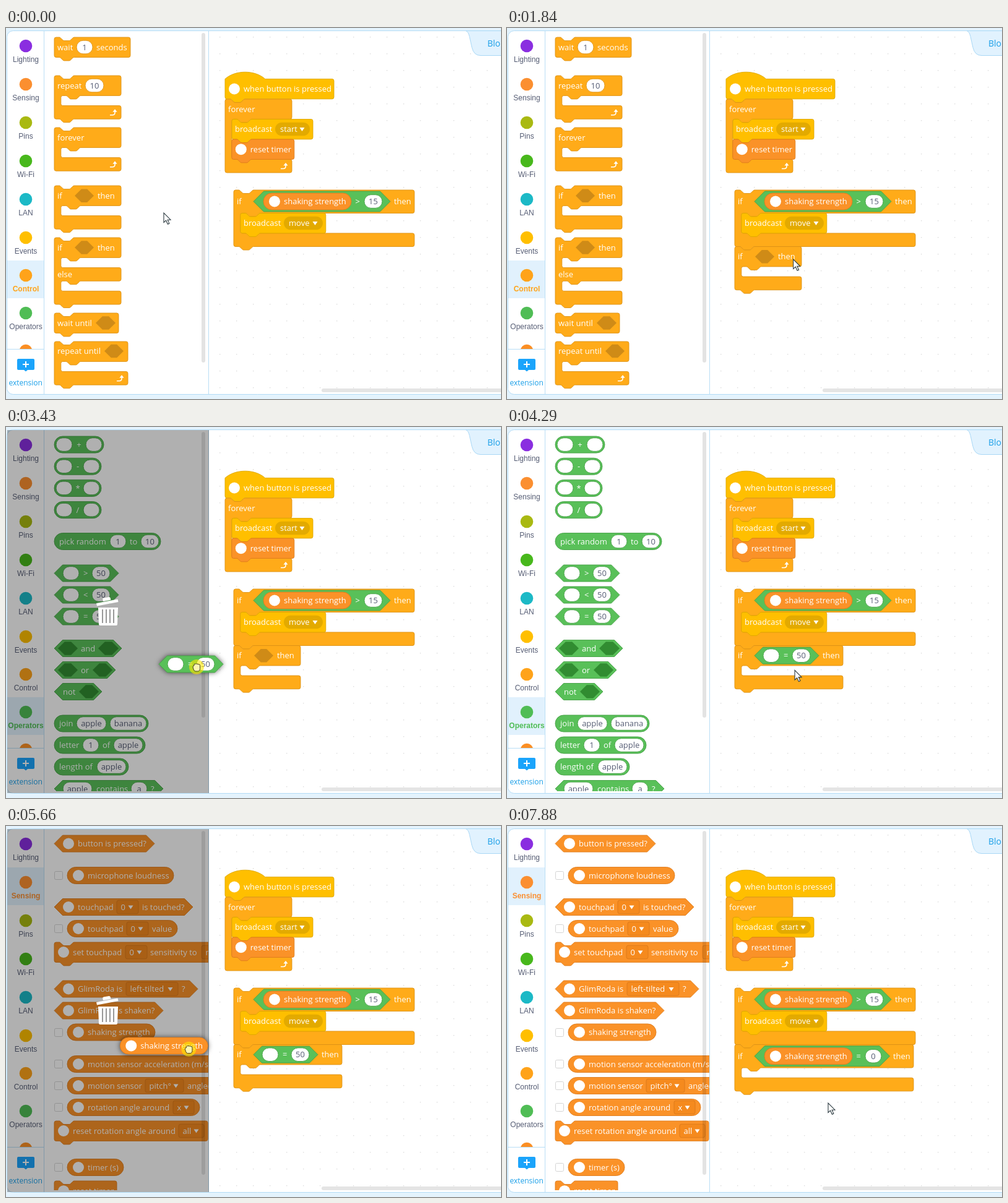
Animation of 800x600 px, one loop 8 s. Source, as an HTML page with a canvas:

```html
<!DOCTYPE html>
<html lang="en">
<head>
<meta charset="utf-8">
<title>Block editor</title>
<style>
html, body { margin: 0; width: 100%; height: 100%; overflow: hidden; background: #e4f3fd; }
canvas { display: block; }
</style>
</head>
<body>
<canvas id="stage" width="800" height="600"></canvas>
<script>
const g = document.getElementById('stage').getContext('2d');
const LOOP = 8000;
const UI = '13px "Open Sans", sans-serif';
const GREY = '#575e75';

// fill, outline, slot
const CONTROL = ['#ffab19', '#dd9216', '#cf8b17'];
const EVENTS = ['#ffbf00', '#dda600', '#e3aa00'];
const OPERATORS = ['#59c059', '#44a044', '#318c31'];
const SENSING = ['#fa9228', '#de7b1b', '#f58a1e'];

const ROW = 32.4, MOUTH = 16.2, ARM = 21.6, PILL = 27, SLOT = 21.6;
let lifted = false;   // the next shape casts a shadow

function shape(d, fill, stroke, width = 0.9) {
  const path = new Path2D(d);
  if (lifted) { g.shadowColor = 'rgba(0,0,0,.65)'; g.shadowBlur = 9; }
  lifted = false;
  if (fill) { g.fillStyle = fill; g.fill(path); }
  g.shadowColor = 'transparent';
  if (stroke) { g.strokeStyle = stroke; g.lineWidth = width; g.stroke(path); }
}

function text(s, x, y, color = '#fff', align = 'left', font = UI) {
  g.font = font;
  g.fillStyle = color;
  g.textAlign = align;
  g.fillText(s, x, y + 4.6);
}

function box(x, y, w, h, r, fill, stroke) {
  g.beginPath();
  g.roundRect(x, y, w, h, r);
  if (fill) { g.fillStyle = fill; g.fill(); }
  if (stroke) { g.strokeStyle = stroke; g.lineWidth = 1; g.stroke(); }
}

function disc(x, y, r, fill) {
  g.beginPath();
  g.arc(x, y, r, 0, 7);
  g.fillStyle = fill;
  g.fill();
}

function pill(x0, x1, y, h, fill, stroke) {
  const r = h / 2, arc = `a${r} ${r} 0 0 1 0 `;
  shape(`M${x0 + r} ${y - r}H${x1 - r}${arc}${h}H${x0 + r}${arc}${-h}z`, fill, stroke);
}

function hex(x0, x1, y, h, fill, stroke) {
  const r = h / 2;
  shape(`M${x0 + r} ${y - r}H${x1 - r}l${r} ${r}l${-r} ${r}H${x0 + r}l${-r} ${-r}z`, fill, stroke);
}

const NOTCH_R = 'c1.4 0 2 .7 2.7 1.4l2.7 2.7c.7 .7 1.4 1.4 2.7 1.4h8c1.4 0 2 -.7 2.7 -1.4l2.7 -2.7c.7 -.7 1.4 -1.4 2.7 -1.4';
const NOTCH_L = 'c-1.4 0 -2 .7 -2.7 1.4l-2.7 2.7c-.7 .7 -1.4 1.4 -2.7 1.4h-8c-1.4 0 -2 -.7 -2.7 -1.4l-2.7 -2.7c-.7 -.7 -1.4 -1.4 -2.7 -1.4';
const HAT = 'c16.9 -14.9 47.9 -14.9 64.8 0';

// heights alternate: row, mouth, row, mouth, ... row
function block(x, y, w, [fill, stroke], heights = [ROW], { hat, cap, loop } = {}) {
  const turn = (dx, dy, sweep) => `a3 3 0 0 ${sweep} ${dx} ${dy}`;
  let d = hat ? `M${x} ${y}${HAT}` : `M${x} ${y + 3}${turn(3, -3, 1)}h5${NOTCH_R}`;
  let bottom = y;
  heights.forEach((h, i) => {
    bottom += h;
    d += i % 2
      ? `H${x + 43}${NOTCH_L}h-5${turn(-3, 3, 0)}V${bottom - 3}${turn(3, 3, 0)}`
      : `H${x + w - 3}${turn(3, 3, 1)}V${bottom - 3}${turn(-3, 3, 1)}`;
  });
  if (!cap) d += `H${x + 32.2}${NOTCH_L}`;
  shape(d + `H${x + 3}${turn(-3, -3, 1)}${hat ? `V${y}` : ''}z`, fill, stroke);
  if (loop) {
    const ax = x + w - 13, ay = bottom - 10.5;
    shape(`M${ax - 5} ${ay + 4}h4q4 0 4 -4v-2`, null, '#fff', 1.6);
    shape(`M${ax - 0.6} ${ay - 1}h7.2l-3.6 -4.4z`, '#fff');
  }
}

// [x] badge, [x, text] label, [x0, x1] empty slot, [x0, x1, text] field, [x0, x1, text, true] menu
function row(y, color, ...items) {
  for (const [a, b, s, menu] of items) {
    if (b === undefined) disc(a, y, 9, '#fff');
    else if (typeof b === 'string') text(b, a, y);
    else if (s === undefined) hex(a, b, y, SLOT, color[2]);
    else if (menu) {
      const round = color === EVENTS;
      if (round) pill(a, b, y, SLOT, color[2]);
      else box(a, y - 10.8, b - a, SLOT, 3, color[2], color[1]);
      text(s, a + (round ? 8 : 6.5), y);
      shape(`M${b - 16.5} ${y - 2.5}h8l-4 6z`, '#fff');
    } else {
      pill(a, b, y, SLOT, '#fff', color[1]);
      text(s, (a + b) / 2, y, GREY, 'center');
    }
  }
}

function pillRow(x0, x1, y, color, ...items) {
  pill(x0, x1, y, PILL, color[0], color[1]);
  row(y, color, ...items);
}

function hexRow(x0, x1, y, color, ...items) {
  hex(x0, x1, y, PILL, color[0], color[1]);
  row(y, color, ...items);
}

function ifBlock(x, y) {
  block(x, y, 108, CONTROL, [ROW, MOUTH, ARM]);
  row(y + 16.2, CONTROL, [x + 5, 'if'], [x + 33, x + 64], [x + 70, 'then']);
}

const compare = (x, y, sign) =>
  hexRow(x, x + 104, y, OPERATORS, [x + 14, x + 40, ''], [x + 47, sign], [x + 61, x + 90, '50']);

const shaking = (x, y) =>
  pillRow(x, x + 142, y, SENSING, [x + 18], [x + 33, 'shaking strength']);

function resetTimer(x, y) {
  block(x, y, 101, SENSING);
  row(y + 16.2, SENSING, [x + 15], [x + 30, 'reset timer']);
}

function controlPalette() {
  const C = CONTROL, loop = { loop: true };
  block(78, 15, 123, C);
  row(31, C, [83, 'wait'], [114, 140, '1'], [146, 'seconds']);
  block(78, 77, 108, C, [ROW, MOUTH, ARM], loop);
  row(93, C, [83, 'repeat'], [128, 158, '10']);
  block(78, 161, 108, C, [ROW, MOUTH, ARM], { loop: true, cap: true });
  row(177, C, [83, 'forever']);
  ifBlock(78, 255);
  block(78, 339, 108, C, [ROW, MOUTH, ARM, MOUTH, ARM]);
  row(355, C, [83, 'if'], [111, 142], [148, 'then']);
  row(398, C, [83, 'else']);
  block(78, 461, 104, C);
  row(477, C, [83, 'wait until'], [145, 177]);
  block(78, 507, 119, C, [ROW, MOUTH, ARM], loop);
  row(522.5, C, [83, 'repeat until'], [159, 190]);
}

function operatorsPalette() {
  const C = OPERATORS;
  ['+', '-', '*', '/'].forEach((sign, i) => {
    const wide = i ? 0 : 4, y = 28.5 + i * 35.2;
    pillRow(78, 154 + wide, y, C, [81, 107, ''], [125 + wide, 151 + wide, '']);
    text(sign, 116 + wide / 2, y, '#fff', 'center');
  });
  pillRow(78, 250, 185, C, [86, 'pick random'], [168, 194, '1'], [200, 'to'], [218, 247, '10']);
  ['>', '<', '='].forEach((sign, i) => compare(78, 236.5 + i * 35, sign));
  hexRow(78, 187, 358, C, [84, 116], [121, 'and'], [149, 182]);
  hexRow(78, 177, 393, C, [84, 116], [121, 'or'], [140, 172]);
  hexRow(78, 155, 428, C, [92, 'not'], [118, 150]);
  pillRow(78, 230, 479.5, C, [86, 'join'], [114, 162, 'apple'], [168, 227, 'banana']);
  pillRow(78, 225, 514.5, C, [86, 'letter'], [124, 150, '1'], [156, 'of'], [174, 221, 'apple']);
  pillRow(78, 198, 549.5, C, [86, 'length of'], [147, 194, 'apple']);
  hexRow(78, 254, 585, C, [92, 139, 'apple'], [146, 'contains'], [202, 228, 'a'], [234, '?']);
}

function sensingPalette() {
  const C = SENSING;
  for (const y of [80, 166, 334, 385, 420, 455, 552]) box(78.5, y - 6.5, 13, 13, 2, '#fff', '#d4d4d4');
  hexRow(78, 240, 28.5, C, [101], [116, 'button is pressed?']);
  pillRow(99, 271, 80, C, [117], [132, 'microphone loudness']);
  hexRow(78, 302, 131, C, [101], [116, 'touchpad'], [179, 214, '0', true], [220, 'is touched?']);
  pillRow(99, 277, 166, C, [117], [132, 'touchpad'], [195, 230, '0', true], [236, 'value']);
  block(78, 188, 319, C);
  row(204, C, [93], [108, 'set touchpad'], [193, 228, '0', true], [233, 'sensitivity to'], [316, 392, 'medium', true]);
  hexRow(78, 310, 263.5, C, [101], [116, 'GlimRoda is'], [194, 278, 'left-tilted', true], [284, '?']);
  hexRow(78, 254, 298.5, C, [101], [116, 'GlimRoda is shaken?']);
  shaking(99, 333.5);
  pillRow(99, 431, 385, C, [117], [132, 'motion sensor acceleration (m/s²) on'], [361, 395, 'x', true], [401, 'axis']);
  pillRow(99, 349, 420, C, [117], [132, 'motion sensor'], [225, 287, 'pitch°', true], [293, 'angle(°)']);
  pillRow(99, 313, 455, C, [117], [132, 'rotation angle around'], [270, 304, 'x', true]);
  block(78, 477, 248, C);
  row(493, C, [93], [108, 'reset rotation angle around'], [279, 320, 'all', true]);
  pillRow(99, 190, 552, C, [117], [132, 'timer (s)']);
  resetTimer(78, 574);
}

// palette, start time, scrollbar end
const TABS = {
  Control: [controlPalette, 0, 541],
  Operators: [operatorsPalette, 2130, 470],
  Sensing: [sensingPalette, 4950, 564],
};
const CATEGORIES = [
  ['Lighting', '#8a2ee0'], ['Sensing', '#fb8f30'], ['Pins', '#a9b912'], ['Wi-Fi', '#48b81c'],
  ['LAN', '#1cb9c6'], ['Events', '#ffbf00'], ['Control', '#ffa31a'], ['Operators', '#50bd55'],
];

function frame() {
  g.fillStyle = '#e4f3fd';
  g.fillRect(0, 0, 800, 600);
  box(1.5, 4.5, 830, 588, 10, '#fff', '#b3dcf6');
  g.fillStyle = '#dcdcdc';
  for (let x = 345; x < 800; x += 27)
    for (let y = 14; y < 590; y += 27) g.fillRect(x, y, 1.4, 1.4);
  shape('M743 4.5q4 1 6 9l4 18q3 13 14 13H802V4.5z', '#e1f2fe', '#a9d8f6', 1);
  text('Blo', 778, 25, '#1a9fe8', 'left', '14px "Open Sans", sans-serif');
}

function sidebar(active) {
  CATEGORIES.forEach(([name, color], i) => {
    const y = i < 6 ? 29 + i * 62 : 339 + (i - 5) * 61;
    const on = name === active;
    if (on) { g.fillStyle = '#e1f1fd'; g.fillRect(2, y - 24, 59, 61); }
    disc(32, y, 10.3, color);
    text(name, 32, y + 21.5, on ? color : GREY, 'center', `${on ? 'bold ' : ''}12px "Liberation Sans", Arial, sans-serif`);
  });
  disc(32, 522, 10.3, '#fb8f24');
  g.fillStyle = '#fff';
  g.fillRect(2, 519, 59, 66);
  g.fillStyle = '#b9def5';
  g.fillRect(2, 519, 59, 1);
  g.fillRect(61, 5, 1, 587);
  g.fillRect(327, 5, 1, 587);
  shape('M20 535H44q2 0 2 2V551q0 2 -2 2H35l-3 2.5l-3 -2.5H20q-2 0 -2 -2V537q0 -2 2 -2z', '#1ba4fb');
  shape('M27 544h10M32 539v10', null, '#fff', 2);
  text('extension', 31.7, 573.5, '#1a9fe8', 'center', '12px "Open Sans", sans-serif');
}

function workspace(t) {
  block(354, 82.4, 176, EVENTS, [ROW], { hat: true });
  row(98.5, EVENTS, [369], [384, 'when button is pressed']);
  block(354, 115, 108, CONTROL, [ROW, 65, ARM], { loop: true, cap: true });
  row(131, CONTROL, [359, 'forever']);
  block(365, 147.5, 131, EVENTS);
  row(163.5, EVENTS, [370, 'broadcast'], [435, 491, 'start', true]);
  resetTimer(364.8, 180);

  block(368, 262, 292, CONTROL, [37.5, ROW, ARM]);
  row(280.5, CONTROL, [373, 'if'], [627, 'then']);
  hex(400, 621, 280.5, 33, OPERATORS[0], OPERATORS[1]);
  shaking(416, 280.5);
  row(280.5, OPERATORS, [564.5, '>'], [579, 608, '15']);
  block(378.8, 299.5, 138, EVENTS);
  row(315.5, EVENTS, [384, 'broadcast'], [449, 512, 'move', true]);

  if (t < 1840) return;
  if (t < 4250) ifBlock(368, 353.5);
  else if (t < 6550) {
    block(368, 353.5, 175, CONTROL, [ROW, MOUTH, ARM]);
    row(369.7, CONTROL, [373, 'if'], [510, 'then']);
    compare(400, 369.7, '=');
    if (t > 6110) pill(414, 440, 369.7, SLOT + 3, null, '#fff');
  } else {
    const value = t < 7330 ? '50' : '0', right = t < 7330 ? 608 : 605;
    block(368, 353.5, right - 316, CONTROL, [37.5, MOUTH, ARM]);
    row(372.2, CONTROL, [373, 'if'], [right + 19, 'then']);
    hex(400, right + 13.5, 372.2, 33, OPERATORS[0], OPERATORS[1]);
    shaking(416, 372.2);
    if (t > 7220 && t < 7880) pill(577, right + 2, 372.2, SLOT + 4, 'rgba(255,255,255,.35)');
    row(372.2, OPERATORS, [564.5, '='], [579, right, value]);
  }
}

function trash(alpha) {
  g.globalAlpha = alpha;
  shape('M149 292H181L180 319q0 2 -2 2H152q-2 0 -2 -2z', '#fff');
  shape('M156 295v22M162 295v22M168 295v22M174 295v22', null, '#999', 2);
  shape('M146 285L180.500 278.500L181.500 283L147 289.500zM157 282l-.8 -3.500q0 -1.500 1.500 -2l9 -1.600q1.500 0 2 1.500l.7 3.400z', '#fff');
  g.globalAlpha = 1;
}

// Linear between keys; any further values hold from the earlier key.
function track(keys, t) {
  let i = 0;
  while (i < keys.length - 1 && keys[i + 1][0] <= t) i++;
  const [t0, x0, y0, ...rest] = keys[i];
  const [t1, x1, y1] = keys[i + 1] || [LOOP, x0, y0];
  const k = (t - t0) / (t1 - t0);
  return [x0 + (x1 - x0) * k, y0 + (y1 - y0) * k, ...rest];
}

// draw, start, dim start, release, end, path
const DRAGS = [
  [ifBlock, 1070, 1060, 1840, 1840,
    [[1070, 78, 255], [1099, 78, 264], [1200, 78, 264], [1400, 280, 330], [1570, 368, 357]].concat([[1840, 368, 357]])],
  [(x, y) => compare(x, y, '='), 3060, 3080, 4250, 4250,
    [[3060, 78, 309], [3430, 247, 383.5], [3530, 247, 383.5], [3790, 371, 391], [3880, 371, 391], [3980, 377, 389.5], [4250, 377, 389.5]]],
  [shaking, 5350, 5460, 6450, 6550,
    [[5350, 94, 344.5], [5460, 94, 344.5], [6110, 386, 380], [6200, 387, 379], [6550, 387, 379]]],
];

const CURSOR = [
  [0, 255, 299, 'arrow'], [80, 255, 299, 'arrow'], [740, 166, 273, 'arrow'],
  [830, 166, 273, 'hand', true], [1069, 166, 273, 'hand', true],
  [1070, 351, 348, 'arrow', true], [1200, 351, 348, 'arrow', true], [1570, 462, 374, 'arrow', true],
  [1840, 462, 374, 'arrow'], [1930, 526, 380, 'arrow'], [2130, 32, 470, 'arrow', true],
  [2230, 278, 305, 'arrow'], [2869, 278, 305, 'arrow'],
  [2870, 131, 311, 'hand', true], [3060, 131, 311, 'hand', true],
  [3430, 308, 388, 'hand', true], [3530, 308, 388, 'hand', true],
  [3790, 432, 396, 'hand', true], [3880, 432, 396, 'hand', true], [3980, 438, 394, 'hand', true],
  [4250, 438, 394, 'arrow'], [4530, 623, 390, 'arrow'], [4720, 623, 390, 'arrow'],
  [4950, 32, 98, 'arrow', true], [5180, 217, 333, 'arrow'], [5349, 217, 333, 'arrow'],
  [5350, 202, 352, 'hand', true, true], [5460, 202, 352, 'hand', true],
  [6110, 504, 380, 'hand', true], [6200, 505, 379, 'hand', true], [6550, 505, 379, 'arrow'],
  [7220, 592, 372, 'arrow', true], [7330, 592, 372, 'arrow'],
  [7520, 519, 448, 'arrow'], [7790, 519, 448, 'arrow', true], [7880, 519, 448, 'arrow'],
];

function cursor([x, y, kind, pressed, denied]) {
  if (pressed) disc(x, y, 12, 'rgba(255,232,0,.6)');
  g.save();
  g.translate(x, y);
  if (kind === 'arrow') {
    shape('M0 0V15.500l3.600 -3.300 2.800 6 2.500 -1.100 -2.700 -5.900H11z', '#fff', '#2c3a40', 1.1);
  } else {
    shape('M-6 0q0 -2 2 -2v-2q1 -2 2.400 -.5q1 -1.500 2.400 0q1.200 -1 2.400 .5q2.400 -.5 2.400 1.500v5q0 4.500 -4 4.500h-3.500q-2 0 -3 -3z', '#fff6b0', '#3c3a20', 1);
  }
  if (denied) shape('M0 4l6 6m0 -6l-6 6', null, '#e8401c', 1.6);
  g.restore();
}

function draw(t) {
  const active = Object.keys(TABS).filter(name => TABS[name][1] <= t).pop();
  const [palette, , scrollEnd] = TABS[active];
  const spill = (t >= 3060 && t < 3160) || (t >= 5350 && t < 5460);

  frame();
  workspace(t);
  sidebar(active);
  g.save();
  if (!spill) {
    g.beginPath();
    g.rect(62, 5, 265, 584);
    g.clip();
  }
  palette();
  g.restore();
  box(316, 8, 6, scrollEnd - 8, 3, 'rgba(0,0,0,.11)');
  box(510, 583, 300, 6, 3, '#e4e4e4');

  for (const [piece, start, dimStart, release, end, path] of DRAGS) {
    if (t >= dimStart && t < release) {
      const k = Math.min(1, (t - dimStart) / 180);
      g.fillStyle = `rgba(0,0,0,${0.31 * k})`;
      g.fillRect(2, 5, 326, 587);
      trash(Math.max(0, 2 * k - 1));
    }
    if (t >= start && t < end) {
      lifted = true;
      piece(...track(path, t));
    }
  }
  cursor(track(CURSOR, t));
}

function tick() {
  draw(performance.now() % LOOP);
  requestAnimationFrame(tick);
}
tick();
</script>
</body>
</html>
```
